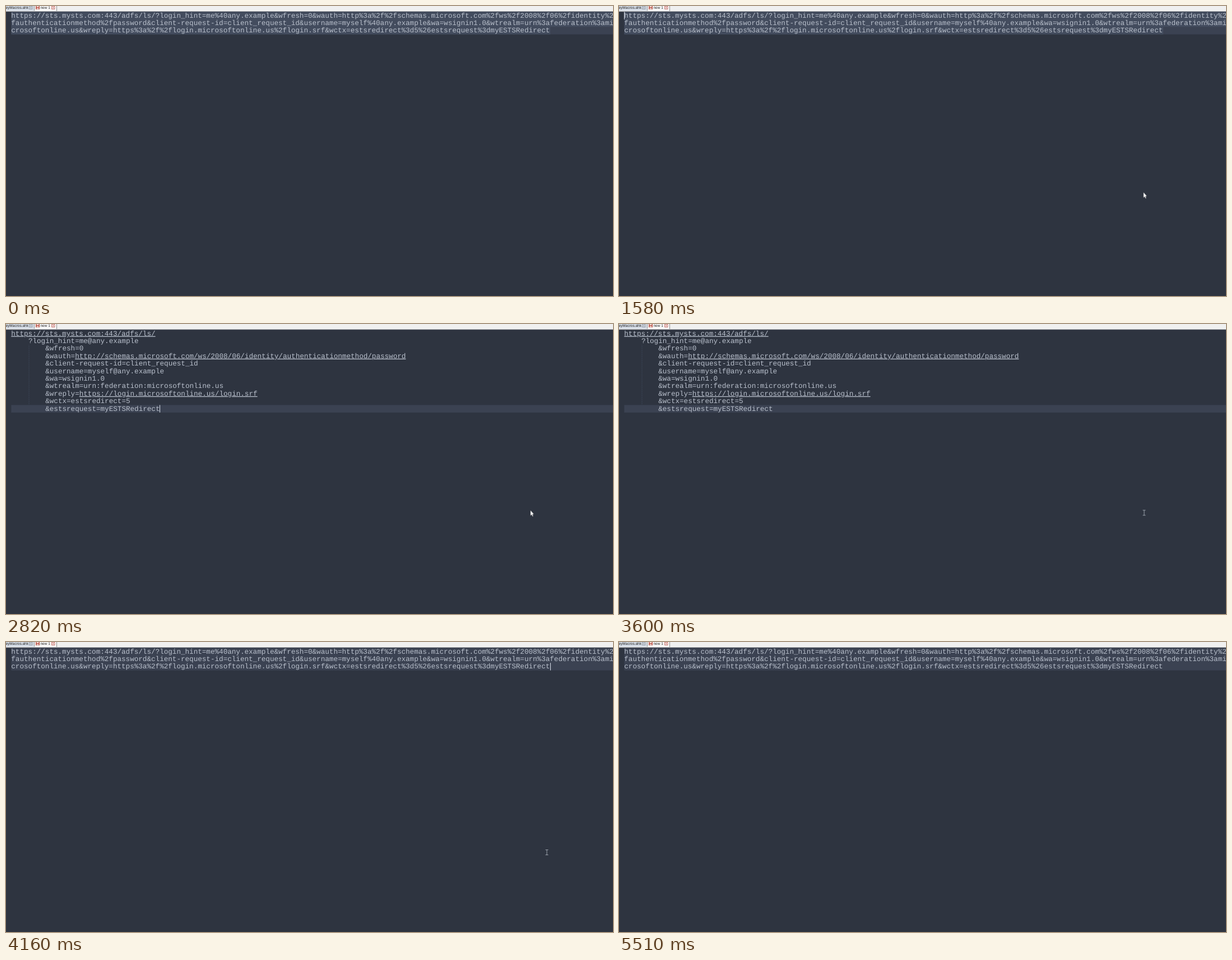
These frames come from a looping animation (1083x517 px, 5600 ms). An HTML page:

```html
<!DOCTYPE html>
<html lang="en">
<head>
<meta charset="utf-8">
<title>URL decoding in a text editor</title>
<style>
  html, body { margin: 0; width: 100%; height: 100%; overflow: hidden; background: #2e3440; }
  svg { display: block; width: 1083px; height: 517px; }
  .code { font: 12.61px "Liberation Mono", "Courier New", monospace; fill: #b9c0cc; white-space: pre; text-rendering: geometricPrecision; }
  .link { text-decoration: underline; text-decoration-thickness: .7px; }
  .tab { font: 6.5px "Liberation Sans", Arial, sans-serif; fill: #222; text-rendering: geometricPrecision; }
  .line { fill: #3b4252; }
  .selected { fill: #434c5e; }
  .caret { fill: #d8dee9; }
  .play { animation: 5600ms step-end infinite; }

  #encoded { animation-name: encoded; }
  #decoded { animation-name: decoded; }
  #selection { animation-name: selection; }
  #caret-start { animation-name: caret-start; }
  #caret-end { animation-name: caret-end; }
  #caret-decoded { animation-name: caret-decoded; }
  #pointer { animation-name: move; }
  #arrow { animation-name: arrow; }
  #beam { animation-name: beam; }

  @keyframes encoded { 0%, 65.714% { visibility: visible } 37.678% { visibility: hidden } 100% { visibility: visible } }
  @keyframes decoded { 0%, 65.714%, 100% { visibility: hidden } 37.678% { visibility: visible } }
  @keyframes selection { 0%, 23.75% { opacity: 1 } 6.964%, 37.678%, 100% { opacity: 0 } }
  @keyframes caret-start { 0%, 6.964%, 37.678%, 100% { opacity: 0 } 2.678%, 28.214% { opacity: 1 } }
  @keyframes caret-end { 0%, 16.964%, 81.964%, 98.392%, 100% { opacity: 0 } 6.964%, 71.964%, 92.5% { opacity: 1 } }
  @keyframes caret-decoded { 0%, 60.178%, 100% { opacity: 0 } 50.357% { opacity: 1 } }
  @keyframes arrow { 0%, 6.964%, 64.285%, 100% { opacity: 0 } 2.678%, 23.75% { opacity: 1 } }
  @keyframes beam { 0%, 23.75%, 85.714%, 100% { opacity: 0 } 6.964%, 64.285% { opacity: 1 } }
  @keyframes move {
    0%, 2.678% { transform: translate(1075px, 495px) }
    4.107% { transform: translate(1030px, 440px) }
    5.535% { transform: translate(978px, 382px) }
    6.964% { transform: translate(948px, 349px) }
    8.392% { transform: translate(937px, 336.5px) }
    65.714% { transform: translate(950px, 354px) }
    66.964% { transform: translate(962px, 367.5px) }
    73.571% { transform: translate(965px, 375px) }
    75.178% { transform: translate(970px, 391px) }
    76.964% { transform: translate(977px, 414px) }
    78.571% { transform: translate(984px, 438px) }
    80.178% { transform: translate(990px, 457px) }
    81.964% { transform: translate(993px, 466.5px) }
    83.392% { transform: translate(999px, 486px) }
    84.642%, 100% { transform: translate(1005px, 510px) }
  }
</style>
</head>
<body>
<svg viewBox="0 0 1083 517">
  <rect width="1083" height="517" fill="#2e3440"/>

  <g id="tabs">
    <rect width="1083" height="10" fill="#f0f0f0"/>
    <rect width="50" height="8.5" fill="#d5dce6"/>
    <rect x="50" width="40" height="9" fill="#f7f7f7"/>
    <path d="M50.5 0V8.5M90.5 0V9" stroke="#777" stroke-width=".8"/>
    <path d="M0 9.8H1083" stroke="#8b8e94" stroke-width=".8"/>
    <text class="tab" x="-.5" y="5.3">eyMacros.ahk</text>
    <text class="tab" x="61.5" y="5.3">new 1</text>
    <path d="M53 0h7v6h-7z" fill="#b9574c"/>
    <path d="M54.5 0h4v2h-4zM54.5 3.5h4v2h-4z" fill="#f3d9d3"/>
    <g fill="none" stroke-width=".8">
      <path d="M41.5.5h5.5v5h-5.5zM43 1.7l2.6 2.6m0-2.6L43 4.3" stroke="#8c929b"/>
      <path d="M81.5.5h5.5v5h-5.5zM83 1.7l2.6 2.6m0-2.6L83 4.3" stroke="#c0564d"/>
    </g>
  </g>

  <g id="encoded" class="play">
    <rect class="line" x="9.3" y="10.4" width="1074" height="40.2"/>
    <path id="selection" class="selected play" d="M9.3 10.4H1083V37.2H971.3V50.6H9.3z"/>
    <g class="code">
      <text x="9.3" y="20.6">https://sts.mysts.com:443/adfs/ls/?login_hint=me%40any.example&amp;wfresh=0&amp;wauth=http%3a%2f%2fschemas.microsoft.com%2fws%2f2008%2f06%2fidentity%2</text>
      <text x="9.3" y="34">fauthenticationmethod%2fpassword&amp;client-request-id=client_request_id&amp;username=myself%40any.example&amp;wa=wsignin1.0&amp;wtrealm=urn%3afederation%3ami</text>
      <text x="9.3" y="47.4">crosoftonline.us&amp;wreply=https%3a%2f%2flogin.microsoftonline.us%2flogin.srf&amp;wctx=estsredirect%3d5%26estsrequest%3dmyESTSRedirect</text>
    </g>
  </g>

  <g id="decoded" class="play">
    <rect class="line" x="9.3" y="144.4" width="1074" height="13.5"/>
    <path d="M41 37.5V144" stroke="#4c566a" stroke-width=".7" stroke-dasharray=".7 .7"/>
    <g class="code">
      <text class="link" x="9.3" y="20.6">https://sts.mysts.com:443/adfs/ls/</text>
      <text x="39.9" y="34">?login_hint=me@any.example</text>
      <text x="70.2" y="47.4">&amp;wfresh=0</text>
      <text x="70.2" y="60.8">&amp;wauth=<tspan class="link">http://schemas.microsoft.com/ws/2008/06/identity/authenticationmethod/password</tspan></text>
      <text x="70.2" y="74.2">&amp;client-request-id=client_request_id</text>
      <text x="70.2" y="87.6">&amp;username=myself@any.example</text>
      <text x="70.2" y="101">&amp;wa=wsignin1.0</text>
      <text x="70.2" y="114.4">&amp;wtrealm=urn:federation:microsoftonline.us</text>
      <text x="70.2" y="127.8">&amp;wreply=<tspan class="link">https://login.microsoftonline.us/login.srf</tspan></text>
      <text x="70.2" y="141.2">&amp;wctx=estsredirect=5</text>
      <text x="70.2" y="154.6">&amp;estsrequest=myESTSRedirect</text>
    </g>
  </g>

  <g class="caret">
    <rect id="caret-start" class="play" x="9" y="10.4" width="1" height="13.4"/>
    <rect id="caret-end" class="play" x="971" y="37.2" width="1" height="13.4"/>
    <rect id="caret-decoded" class="play" x="274" y="144.4" width="1" height="13.4"/>
  </g>

  <g id="pointer" class="play">
    <path id="arrow" class="play" d="M-1.3-4.5V5.5L.9 3.4 2.4 6.8l1.5-.7L2.5 2.8H5.2z" fill="#fff" stroke="#15181d" stroke-width=".4"/>
    <path id="beam" class="play" d="M-2.5-4.5H2.5M-2.5 4.5H2.5M0-4.5V4.5" fill="none" stroke="#b4bac4" stroke-width=".8"/>
  </g>
</svg>
</body>
</html>
```
